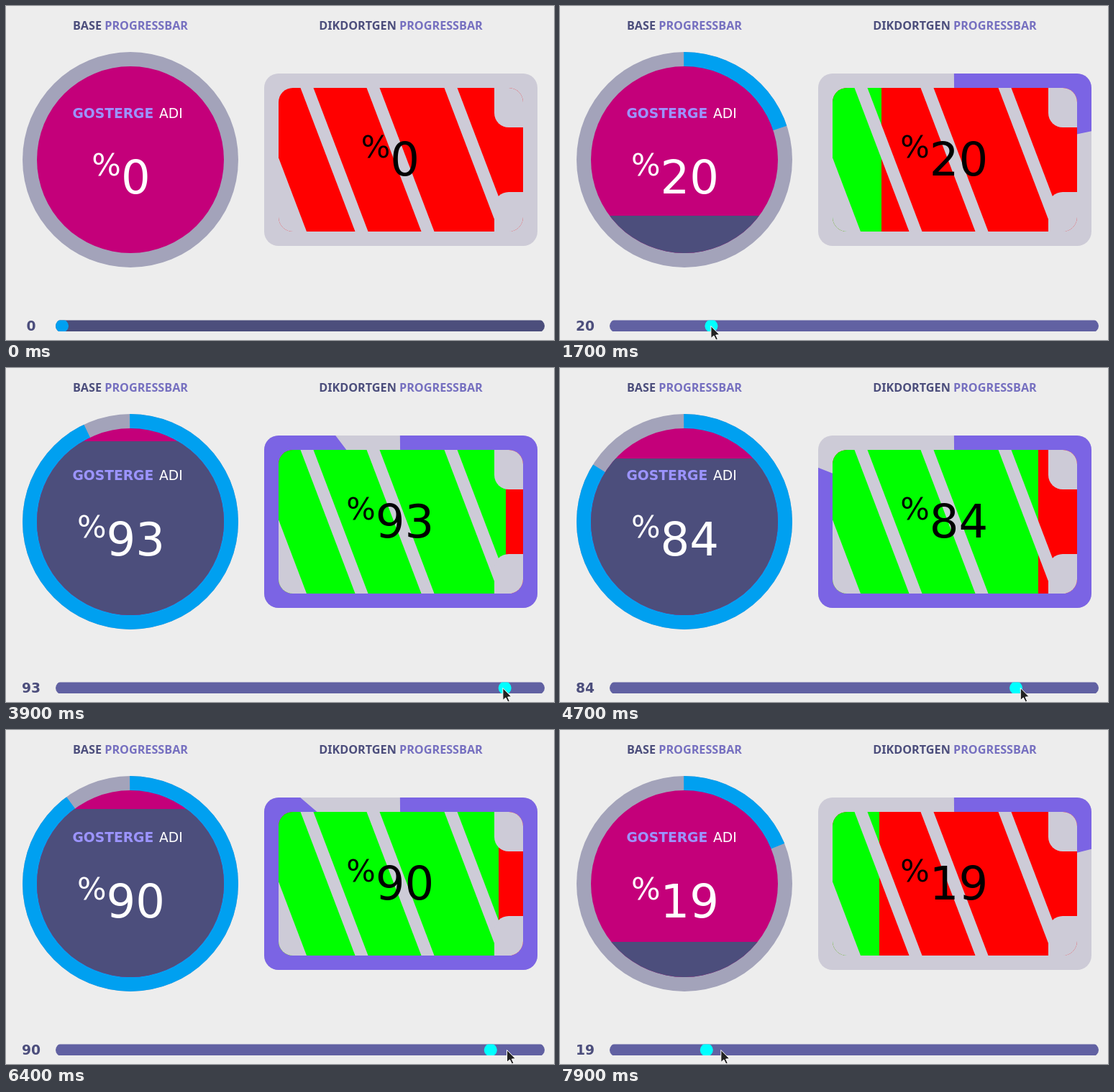
Animation, 762 px wide and 465 px high, one loop 8000 ms. Source, as an HTML page with a canvas:

```html
<!DOCTYPE html>
<html>
<head>
<meta charset="utf-8">
<style>
  html, body { margin: 0; width: 762px; height: 465px; overflow: hidden; background: #ededed; }
  canvas { display: block; }
</style>
</head>
<body>
<canvas id="stage" width="762" height="465"></canvas>
<script>
const g = document.getElementById('stage').getContext('2d');
const NAVY = '#4c4e7c', LILAC = '#7670c0', PALE = '#cdcbd7';
const SANS = '"DejaVu Sans", sans-serif';
const LAG = 70; // ms by which the pointer trails the handle

// Drags of the slider: time and value, straight in between
const DRAGS = [[1100, 0], [1600, 20], [1700, 20], [2800, 57], [3840, 93], [4200, 93],
  [4900, 80], [5200, 83], [5300, 83], [6000, 100], [6200, 100], [7200, 50], [7900, 19]];

const ramp = (t, from, to) => Math.min(1, Math.max(0, (t - from) / (to - from)));
const handleX = v => 78 + 6.62 * v;

function valueAt(t) {
  let v = 0, last = 0;
  for (const [time, value] of DRAGS) {
    v += (value - v) * ramp(t, last, time);
    if (t <= time) break;
    last = time;
  }
  return v;
}

function text(str, x, y, font, color, align = 'left') {
  g.font = font;
  g.fillStyle = color;
  g.textAlign = align;
  g.fillText(str, x, y);
}

function width(str, font) {
  g.font = font;
  return g.measureText(str).width;
}

function rect(x, y, w, h, color) {
  g.fillStyle = color;
  g.fillRect(x, y, w, h);
}

function shape(points, color) {
  g.beginPath();
  points.forEach(p => g.lineTo(...p));
  g.closePath();
  g.fillStyle = color;
  g.fill();
}

function rounded(x, y, w, h, r, color) {
  g.beginPath();
  g.roundRect(x, y, w, h, r);
  g.fillStyle = color;
  g.fill();
}

function disc(r, color) {
  g.beginPath();
  g.arc(173, 214, r, 0, 7);
  g.fillStyle = color;
  g.fill();
}

// Draws inside the most recent path
function clipped(draw) {
  g.save();
  g.clip();
  draw();
  g.restore();
}

// Pie slice from twelve o'clock, stretched sideways by sx
function sector(x, y, sx, v, color) {
  if (!v) return;
  g.save();
  g.translate(x, y);
  g.scale(sx, 1);
  g.rotate(-Math.PI / 2 - 0.006);
  g.beginPath();
  g.moveTo(0, 0);
  g.arc(0, 0, 400, 0, v / 50 * Math.PI);
  g.fillStyle = color;
  g.fill();
  g.restore();
}

function percent(v, cx, y, color) {
  const big = `64px ${SANS}`, small = `${64 * 2 / 3}px ${SANS}`;
  const sign = width('%', small);
  const x = cx - (sign + width(v, big)) / 2;
  text('%', x, y - 25, small, color);
  text(v, x + sign, y, big, color);
}

function title(word, cx) {
  const font = '700 16.2px "Noto Sans", sans-serif';
  const first = word + ' ', second = 'PROGRESSBAR';
  const w = width(first, font);
  const x = cx - (w + width(second, font)) / 2;
  text(first, x, 33, font, NAVY);
  text(second, x + w, 33, font, LILAC);
}

function drawCircle(v) {
  disc(150, '#a3a3ba');
  clipped(() => sector(173, 214, 1, v, '#00a0f0'));
  disc(130, '#c4007a');
  clipped(() => rect(43, 344 - Math.round(2.6 * v), 260, 260, NAVY));
  g.beginPath();
  g.rect(90, 130, 154, 40);
  clipped(() => {
    text('GOSTERGE', 92.5, 156, `bold 18.7px ${SANS}`, '#9c94ff');
    text('ADI', 213, 156, `18.7px ${SANS}`, '#fff');
  });
  percent(v, 160, 261, '#fff');
}

function slant(x, w) {
  shape([[x, 114], [x + w, 114], [x + w + 76, 314], [x + 76, 314]], PALE);
}

function drawBox(v) {
  rounded(359, 94, 380, 240, 20, PALE);
  clipped(() => sector(549, 214, 380 / 240, v, '#7b64e4'));
  g.beginPath();
  g.roundRect(379, 114, 340, 200, 20);
  clipped(() => {
    rect(379, 114, 340, 200, '#f00');
    rect(379, 114, Math.round(3.4 * v), 200, '#0f0');
    slant(300, 42);
    for (const x of [409.5, 501.5, 609.5]) slant(x, 18);
    rounded(679, 104, 50, 65, [0, 0, 0, 20], PALE);
    rounded(679, 259, 50, 65, [20, 0, 0, 0], PALE);
  });
  percent(v, 534.3, 236, '#000');
}

function drawSlider(v, t) {
  text(v, 35, 452, `bold 18.7px ${SANS}`, NAVY, 'center');
  g.beginPath();
  g.rect(60, 437.5, 700, 15.5);
  clipped(() => {
    rounded(69, 436.5, 680, 18, 9, t < 500 ? NAVY : '#6161a2');
    rounded(handleX(v) - 9, 436.5, 18, 18, 9, t < 1000 ? '#00a0f0' : '#0ff');
  });
}

function drawPointer(t) {
  if (t < 400) return;
  const away = 1 - ramp(t, 400, 800);
  g.save();
  g.translate(handleX(valueAt(t - LAG)) - 0.5 + 32 * away, 445.5 + 16 * away);
  shape([[0, 0], [0, 17], [4, 13.5], [7, 19.5], [9.5, 18.3], [6.8, 12.6], [12, 12.2]], '#222');
  g.strokeStyle = '#fff';
  g.stroke();
  g.restore();
}

function frame(now) {
  const t = Math.floor(now % 8000 / 100) * 100;
  const v = Math.round(valueAt(t));
  rect(0, 0, 762, 465, '#ededed');
  title('BASE', 173);
  title('DIKDORTGEN', 549);
  drawCircle(v);
  drawBox(v);
  drawSlider(v, t);
  drawPointer(t);
  requestAnimationFrame(frame);
}
requestAnimationFrame(frame);
</script>
</body>
</html>
```
